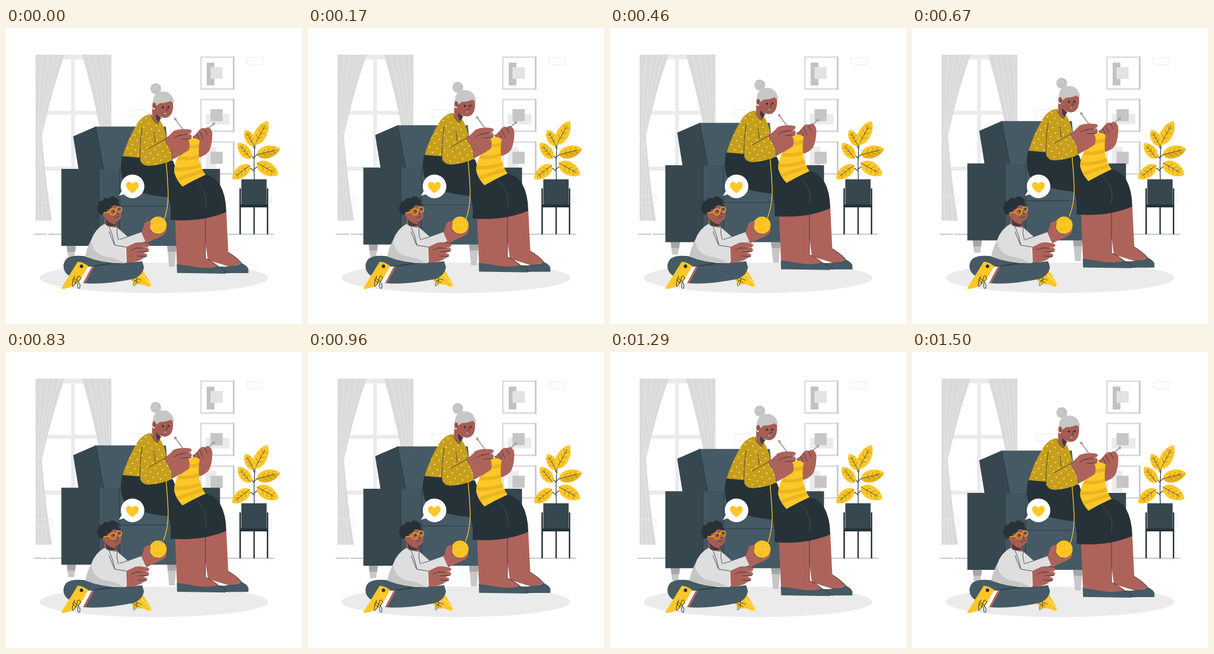
An HTML page that plays this animation: 500 by 500 pixels, repeating every 1.54 s.

```html
<!DOCTYPE html>
<html lang="en">
<head>
<meta charset="utf-8">
<title>Knitting together</title>
<style>
html, body { margin: 0; width: 100%; height: 100%; overflow: hidden; background: #fff }
svg { display: block; width: 100%; height: 100% }
.line { fill: none; stroke: #263238; stroke-width: .8; stroke-linecap: round; stroke-linejoin: round }
.skin { fill: #ae635a }
.face { fill: #a65c52 }
.gold { fill: #ffc727 }
.dark { fill: #263238 }
.slate { fill: #37474f }
.steel { fill: #455a64 }
</style>
</head>
<body>
<svg viewBox="0 0 500 500">
  <defs>
    <pattern id="dots" width="13" height="16" patternUnits="userSpaceOnUse" patternTransform="rotate(12)">
      <rect width="13" height="16" fill="#c79f1b"/>
      <g fill="#fff7d6"><circle cx="3" cy="4" r="1.1"/><circle cx="9.5" cy="12" r="1.1"/></g>
    </pattern>
    <clipPath id="strip"><path id="knitShape" d="M309 187Q319 184 327 190Q324 209 327 225Q330 239 337 248Q317 257 298 268Q287 256 284 243Q284 229 291 218Q304 205 309 187Z"/></clipPath>
  </defs>

  <!-- window and curtains -->
  <path fill="#ebebeb" d="M66 45H178V53H66ZM110 53H116.500V240H110ZM62 140H172V146.500H62ZM62 234H120V241H62Z"/>
  <g fill="#dadada">
    <path d="M50 45H99Q77 107 61 181V187Q67 260 77.500 325.500H50Z"/>
    <path d="M128.500 45H178V166H158Q145 102 128.500 45Z"/>
  </g>
  <g fill="none" stroke="#e8e8e8" stroke-width=".9">
    <path d="M61 45Q56 110 54 181M72 45Q62 110 56 181M82 45Q66 110 58 181M91 45Q70 110 60 181M54 188L55 325M56 188Q60 260 62 325M58 188Q63 260 69 325M50 184H61"/>
    <path d="M138 45Q155 100 163 166M149 45Q161 100 168 166M160 45Q168 100 172 166M170 45Q174 100 176 166"/>
    <path d="M407 50H434V62H412L410 60H407ZM209.500 138.500H237V150H209.500ZM50 283H78V294.500H50ZM430 283H448.500V294H430Z"/>
  </g>

  <g id="pictures"></g>
  <path d="M47 348.300H69M72 348.300H453" stroke="#263238" stroke-width=".5"/>
  <ellipse cx="250" cy="422" rx="193" ry="25.800" fill="#ebebeb"/>

  <!-- plant -->
  <path class="slate" d="M397.500 255.500H440.300V299H397.500Z"/>
  <path class="dark" d="M394.300 271H396.800V298H440.600V271H443V348.500H440.600V303H420.300V348.500H418V303H396.800V348.500H394.300Z"/>
  <path class="line" d="M419.500 256Q418 222 421 193M419.500 218Q430 208 440 207M419.500 221Q411 211 404 207M419.500 238Q429 229 440 235M419.500 242Q409 231 397 241M420 204Q414 193 409 184" style="stroke-width:1.200"/>
  <g id="leaves"></g>

  <g id="rocker">
    <!-- armchair -->
    <path fill="#c7c7c7" d="M102.500 367H118L115 389H105ZM272 367H288L285 403H275.500Z"/>
    <path fill="#a6a6a6" d="M102.500 367H118L117 378H103.800ZM272 367H288L287 378H273.500Z"/>
    <path class="slate" d="M332 238H361.500V290H332Z"/>
    <path class="steel" d="M151 166.500H270L282 290H165Z"/>
    <path class="slate" d="M113.500 183L151.500 166.500L166 245H123.500Z"/>
    <path class="steel" d="M190 270H288V368H190Z"/>
    <path class="slate" d="M93.500 238H158V368H93.500Z"/>
    <path fill="#425660" d="M157 238H192V368H157Z"/>
    <path class="line" d="M151.500 166.500L165 238M157 238V367M192 238V367M192 301H276"/>

    <!-- legs and shoes -->
    <path fill="#ae635a" d="M330 312L372 307Q374 350 375.500 379Q390 387 398.500 397L380 404L341 392ZM285.500 320L337 316V389Q350 395 358.500 402L345 408L289 405Z"/>
    <path class="line" d="M337 320V389Q350 395 358 402M375.500 379Q389 387 398 397"/>
    <path class="steel" d="M358 403Q372 404 378 402Q391 402 397.500 397Q407 401 409.500 407V414H357Z"/>
    <path class="steel" d="M288.500 399Q306 401 323 404Q345 407 357 402.500Q367 405 371.500 412V415L289 413.800Z"/>
    <path class="line" d="M357 402.500Q367 405 371.500 412M371 412L377 414" />

    <!-- skirt -->
    <path class="dark" d="M197 215L282 224L288 240L331 247Q349 248 361 264Q372 283 372 311Q330 328.500 278 324Q280 303 274 286Q241 283 221 275Q199 270 195 248Q192 231 197 215Z"/>
    <path class="line" d="M320 258Q342 276 337 305" style="stroke:#455a64"/>

    <!-- torso -->
    <path class="face" d="M247 136L261 146Q259 156 262 165L250 162Q246 152 247 136Z"/>
    <path d="M241 146Q228 150 220 164Q205 190 197 216.500L226 219Q226 232 239 233Q263 232 282 222.500Q280 204 267 188L271 184Q267 165 258 152L257 163Q247 157 246 146Z" fill="url(#dots)"/>
    <path class="line" d="M230 169Q226 194 226 219Q228 233 239 233M281 222Q281 205 267 189L240 204M257 163Q247 157 245 146M250 176L252 193"/>

    <!-- head -->
    <circle cx="253" cy="102.500" r="9.200" fill="#c7c7c7"/>
    <path class="line" d="M247 96Q256 92 260 101M248 108Q258 108 259 99" style="stroke:#aaa;stroke-width:.6"/>
    <path class="face" d="M249 122Q260 111 281 120Q284 134 280 144Q275 153 266 151.500Q255 149 251 140Q245 134 249 122Z"/>
    <path class="dark" d="M254 145Q258 151 263 151Q259 155 258 160Q252 153 254 145Z" opacity=".8"/>
    <path fill="#c7c7c7" d="M248.500 127Q247 111 261 107.500Q280 105 284 125Q280 127 278 123Q271 127 260 127L252 133Z"/>
    <ellipse class="face" cx="250.500" cy="131" rx="3.200" ry="5"/>
    <circle cx="250" cy="136.500" r="1.300" fill="#fff"/>
    <g class="dark"><ellipse cx="265" cy="134" rx="1.600" ry="2"/><ellipse cx="274.500" cy="133.700" rx="1.500" ry="2"/></g>
    <path class="line" d="M271 134L272.500 139L270 139.500M250 129Q253 131 250 134"/>
    <path d="M266 142.500Q269 144.500 272 142.500Q271 146 267.500 145Z" fill="#fff" stroke="#263238" stroke-width=".5"/>

    <!-- knitting -->
    <path class="line" d="M286 154L306 181M351 162L324 184" style="stroke:#a5a0a3;stroke-width:2"/>
    <g fill="#a5a0a3"><circle cx="286" cy="153.800" r="2.300"/><circle cx="351" cy="161.800" r="2.300"/></g>
    <path class="skin" d="M315 184Q322 179 326 173Q331 167 336 170Q341 165 345 170Q349 174 348.500 182Q348 198 343 208Q336 217 324 219L320 192Z"/>
    <path class="line" d="M322 179L327 188M327 174L333 187M335 170L340 180M316 183L322 192"/>
    <use href="#knitShape" class="gold"/>
    <g clip-path="url(#strip)" fill="none" stroke="#e9b520" stroke-width="6">
      <path d="M300 199Q315 204 329 197M286 219Q307 224 330 215M280 238Q306 241 332 231M286 257Q308 249 337 240"/>
    </g>
    <path class="skin" d="M267 188.500Q277 181 283 174Q295 169 311 171.500Q316 174 312 177L305 179.500L312 180Q316 183 312 187L308 189Q312 196 309 206Q296 215 281.500 222Q280 204 267 188.500Z"/>
    <path class="line" d="M294 181L312 178.500M296 188L312 187M284 186Q290 181 296 181"/>
    <path class="line" d="M270.500 227Q273 253 274 279Q274 307 266 327" style="stroke:#ffc727;stroke-width:1.300"/>
  </g>

  <!-- boy -->
  <path class="gold" d="M210 424L229 406L247 435L241 438Q231 431 218 434Z"/>
  <path d="M229 417L246 434L241 438" fill="none" stroke="#fff" stroke-width="1"/>
  <path class="line" d="M215 425L225 430M218 422L229 426M221 424Q212 433 216 436Q221 433 221 424"/>
  <path class="steel" d="M137 386Q112 382 102 390Q95 398 98 408Q101 416 108 419L148 403L131 431Q165 434 215 424Q231 418 233 404L230 394Q190 400 137 386Z"/>
  <path class="line" d="M148 402Q172 399 190 393M150 402L203 396"/>
  <path fill="#fff" d="M137 403L147 403L131 431L119 431Z"/>
  <path class="skin" d="M145 403H149L134 431H130Z"/>
  <path class="gold" d="M93 440L121 395Q128 394 139 402L126 425Q117 437 97 441Z"/>
  <circle class="dark" cx="127.500" cy="402.500" r="2.900"/>
  <path class="line" d="M112 425L119 431M114 422L122 428M116 419Q110 434 113 437Q119 431 121 420Q125 417 126 423L122 429Q119 440 124 440Q127 434 122 428" style="stroke-width:1"/>
  <path fill="#dedede" d="M166 331Q150 340 144 358Q136 373 134 386Q167 399 203 397L202 370L207 369L237 360L231 344L206 353L188 337Q180 328 166 331Z"/>
  <path fill="#c6c6c6" d="M134 386Q136 373 144 358Q145 378 164 385L183 389L200 397Q163 397 134 386Z"/>
  <path class="line" d="M174 335Q181 351 184 367L203 370M188 337Q186 347 190 358M183 366L174 344M205 353L192 357"/>
  <path class="face" d="M167 319L184 326L188 337Q176 337 166 331Z"/>
  <path class="dark" d="M168 322Q174 331 187 332Q181 337 170 334Z" opacity=".75"/>
  <path class="face" d="M165 304Q170 290 187 297Q197 306 195 318Q192 329 180 328Q169 327 166 318Z"/>
  <path class="dark" d="M157 313Q151 304 157 297Q155 292 163 292Q165 285 174 288Q179 281 186 287Q192 289 190 297Q195 299 192 303Q187 298 180 300Q177 306 171 307L169 315Q162 318 157 313Z"/>
  <ellipse class="face" cx="167" cy="315" rx="3.600" ry="4.500"/>
  <g fill="none" stroke="#e8ae17" stroke-width="1.500">
    <circle cx="180.500" cy="310.500" r="5.200"/><circle cx="191" cy="306.500" r="4.500"/>
    <path d="M166 312L175 311M185 308L187 307"/>
  </g>
  <g class="dark"><circle cx="182" cy="309.500" r="1.400"/><circle cx="191" cy="306" r="1.300"/></g>
  <path class="line" d="M187 309L190 314L187 315M183 320Q187 321 191 318"/>
  <path class="skin" d="M229 346L236 329Q242 324 244 329L243 342L255 349L270 339Q273 343 267 349Q258 355 248 358L237 364Z"/>
  <circle class="gold" cx="256.800" cy="333" r="14.500"/>
  <path d="M246 327Q255 318 266 325M245 332Q257 323 268 330M247 338Q256 342 267 333M251 322Q247 334 257 345M258 320Q253 333 263 344M249 342Q260 343 270 334" fill="none" stroke="#e5b01c" stroke-width=".6"/>
  <path class="skin" d="M234 330Q241 323 244.500 328L243 342L247 350L237 361L229 346Z"/>
  <path class="skin" d="M203 370L219 362.500Q231 361 241 365Q244 368 239 370L228 371L240 372Q244 375 239 378L232 380L238 382Q240 387 233 388Q224 396 204 396.500Z"/>
  <path class="line" d="M221 372L239 371M224 378L240 377.500M222 385L237 386M211 375L222 371"/>

  <!-- speech bubble -->
  <path d="M214 247.500A20 20 0 1 1 199 281L190.500 283.500L195.500 275.500A20 20 0 0 1 214 247.500Z" fill="#fff"/>
  <path class="gold" d="M213.500 279Q203 272 202.800 265.500C203 259 211 258 213.500 264C216 258 224 259 224.200 265.500Q224 272 213.500 279Z"/>
</svg>
<script>
const $ = id => document.getElementById(id);
const rect = (x, y, w, h, fill) => `<rect x="${x}" y="${y}" width="${w}" height="${h}" fill="${fill}"/>`;
const frame = (y, art) => rect(328, y, 58, 56.5, '#dcdcdc') + rect(330.5, y + 2.5, 52.5, 51, '#fff') +
  rect(383.5, y, 2.5, 56.5, '#c9c9c9') + art;

$('pictures').innerHTML =
  frame(48, rect(339, 58.5, 13, 38.5, '#c2c2c2') + rect(345.5, 66, 20.5, 20, '#e3e3e3')) +
  frame(119.5, rect(337.5, 145, 40, 18, '#ebebeb') + rect(345.5, 137, 20.5, 20.5, '#c6c6c6')) +
  frame(191.5, rect(337.5, 201, 18, 36, '#ebebeb') + rect(345.5, 209, 20.5, 20.5, '#c6c6c6'));

// A leaf from stem end to tip; the second half can be shaded.
function leaf(x, y, tipX, tipY, width, shade = '#ffc727') {
  const dx = tipX - x, dy = tipY - y, length = Math.hypot(dx, dy);
  const at = (u, v) => `${x + dx * u - dy * v / length} ${y + dy * u + dx * v / length}`;
  const side = (v, fill) =>
    `<path d="M${at(0, 0)}C${at(.1, v)} ${at(.75, v)} ${at(1, 0)}Z" fill="${fill}"/>`;
  const veins = [.25, .45, .65].map(u =>
    `M${at(u + .12, width * .4)}L${at(u, 0)}L${at(u + .12, -width * .4)}`).join('');
  return side(-width, '#ffc727') + side(width, shade) +
    `<path class="line" style="stroke-width:.8" d="M${at(0, 0)}L${at(.8, 0)}"/>` +
    `<path class="line" style="stroke-width:.4" d="${veins}"/>`;
}

$('leaves').innerHTML =
  leaf(420, 197, 442, 157, 14) +
  leaf(419, 199, 404, 172, 11) +
  leaf(424, 214, 463, 204, 14, '#e5b01c') +
  leaf(413, 220, 392, 194, 12) +
  leaf(424, 228, 460, 248, 15) +
  leaf(412, 232, 382, 255, 13);

const LOOP = 1540, PEAK = 730, REST = 1500, RISE = 10;
const start = performance.now();

function draw() {
  const t = (performance.now() - start) % LOOP;
  const lift = RISE * Math.max(0, Math.min(t / PEAK, (REST - t) / (REST - PEAK)));
  $('rocker').setAttribute('transform', `translate(0 ${-lift})`);
  requestAnimationFrame(draw);
}
draw();
</script>
</body>
</html>
```
